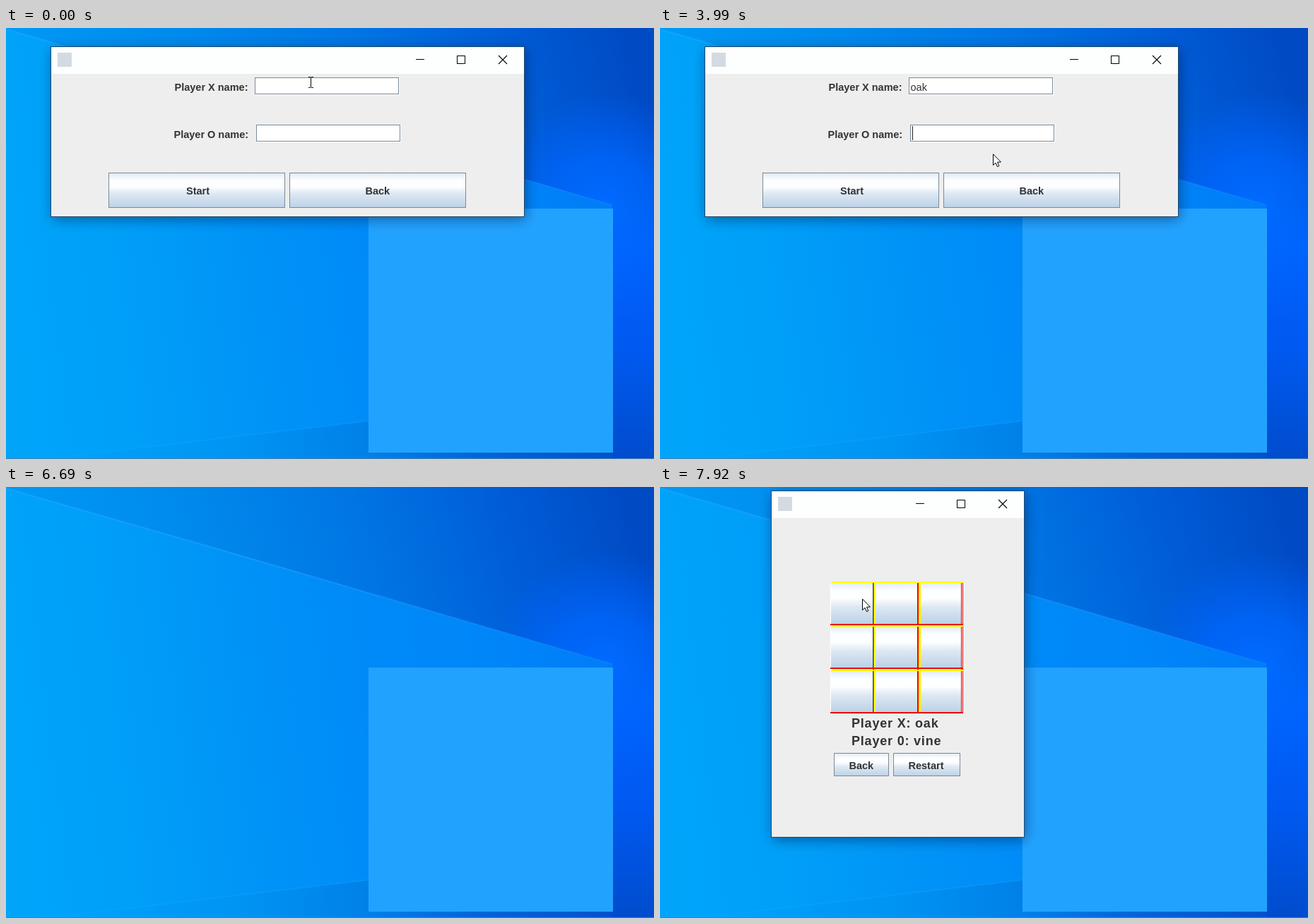
An HTML page with a canvas for the animation above (8000 ms loop, 917 by 611 pixels).

```html
<!DOCTYPE html>
<html lang="en">
<head>
<meta charset="utf-8">
<title>Player setup</title>
<style>
html, body { margin: 0; width: 100%; height: 100%; overflow: hidden; }
canvas { display: block; }
</style>
</head>
<body>
<canvas id="stage" width="917" height="611"></canvas>
<script>
const W = 917, H = 611, LOOP = 8000;
const NAME_X = 'oak', NAME_O = 'vine';
const FONT = '"Liberation Sans", Arial, sans-serif';
const INK = '#333', EDGE = '#7a8a99', YELLOW = '#ffff00', RED = '#f00000', DARK = '#3d4248';
const stage = document.getElementById('stage').getContext('2d');

// [start, x, y, shape]; every position holds until the next one
const pointer = [
  [0, 431, 77, 'beam'], [120, 432, 79, 'beam'], [250, 434, 84, 'beam'],
  [380, 437, 90, 'beam'], [510, 438, 93, 'beam'],
  [770, 438, 108, 'arrow'], [900, 440, 148, 'beam'], [1030, 441, 176, 'arrow'],
  [1160, 441, 203, 'arrow'], [1310, 456, 217, 'arrow'], [1470, 468, 209, 'arrow'],
  [1590, 472, 193, 'arrow'], [1740, 471, 178, 'arrow'], [5320, 469, 176, 'arrow'],
  [5440, 375, 16, 'arrow'], [5560, 267, 97, 'arrow'], [5700, 264, 160, 'arrow'],
  [5830, 257, 214, 'arrow'], [5950, 254, 223, 'arrow'], [6250, 258, 231, 'arrow'],
  [6400, 266, 232, 'arrow'], [6540, 114, 188, 'arrow'], [6690, 0, 0, 'none'],
  [7220, 301, 81, 'arrow'], [7370, 310, 74, 'arrow'], [7510, 316, 51, 'arrow'],
  [7640, 270, 28, 'arrow'], [7790, 306, 92, 'arrow'], [7920, 286, 158, 'arrow']
];
const gamePlace = [[7220, 189, 58], [7370, 198, 51], [7510, 204, 28], [7640, 158, 5]];
const caretX = [[0, 0], [250, 1], [770, 0], [1310, 1], [1740, 0], [2350, 1], [2770, 0], [3300, 1], [3990, 0]];
const typedX = [[0, 0], [3450, 1], [3570, 3]];
const typedO = [[0, 0], [4520, 1], [4650, 3], [4770, 4]];

const at = (steps, t) => steps.reduce((found, step) => step[0] <= t ? step : found, steps[0]);
const between = (t, from, to) => t >= from && t < to;

function layer(paint) {
  const canvas = document.createElement('canvas');
  canvas.width = W;
  canvas.height = H;
  paint(canvas.getContext('2d'));
  return canvas;
}

function fill(c, color, x, y, w, h) {
  c.fillStyle = color;
  c.fillRect(x, y, w, h);
}

function outline(c, color, x, y, w, h) {
  c.strokeStyle = color;
  c.lineWidth = 1;
  c.strokeRect(x + .5, y + .5, w - 1, h - 1);
}

function path(c, points, close) {
  c.beginPath();
  points.forEach(([x, y]) => c.lineTo(x, y));
  if (close) c.closePath();
}

function text(c, string, x, y, size, weight = 'bold', spacing = 0) {
  c.font = `${weight} ${size}px ${FONT}`;
  c.letterSpacing = spacing + 'px';
  c.fillStyle = INK;
  c.fillText(string, x, y);
  const width = c.measureText(string).width;
  c.letterSpacing = '0px';
  return width;
}

function ramp(gradient, stops) {
  stops.forEach(([offset, color]) => gradient.addColorStop(offset, color));
  return gradient;
}

const wallpaper = layer(c => {
  fill(c, ramp(c.createLinearGradient(60, 210, 880, 0), [
    [0, '#0099f5'], [.3, '#0088ec'], [.55, '#0075e4'], [.8, '#005cd6'], [1, '#004ac4']
  ]), 0, 0, W, H);
  fill(c, ramp(c.createLinearGradient(0, 250, 0, H), [
    [0, 'rgba(0,96,250,0)'], [.15, 'rgba(0,96,250,1)'], [.55, 'rgba(0,90,242,1)'], [1, 'rgba(0,76,205,1)']
  ]), 513, 250, W - 513, H - 250);
  fill(c, ramp(c.createRadialGradient(845, 255, 10, 845, 255, 165), [
    [0, 'rgba(0,106,255,1)'], [.4, 'rgba(0,103,255,.75)'], [1, 'rgba(0,98,255,0)']
  ]), 0, 0, W, H);

  // broad light beam, darkening softly towards its lower right
  path(c, [[0, 2], [300, 88], [858, 251], [858, 300], [513, H], [0, H]], true);
  c.fillStyle = ramp(c.createLinearGradient(0, 360, 858, 250), [
    [0, '#00a5fa'], [.2, '#009ef8'], [.42, '#0092f7'], [.6, '#008af8'], [.8, '#0086f8'], [1, '#007cf8']
  ]);
  c.fill();
  path(c, [[60, H], [513, 557], [858, 508], [858, H]], true);
  c.fillStyle = ramp(c.createLinearGradient(100, 0, 858, 0), [
    [0, '#00a2f9'], [.3, '#0094f3'], [.55, '#0080e8'], [.75, '#0066d8'], [1, '#0052cc']
  ]);
  c.fill();

  c.lineWidth = 2;
  c.strokeStyle = ramp(c.createLinearGradient(0, 0, 858, 251), [
    [0, 'rgba(40,170,255,.45)'], [.4, 'rgba(35,160,255,.6)'], [1, 'rgba(30,145,255,.3)']
  ]);
  path(c, [[0, 2], [300, 88], [858, 251]]);
  c.stroke();
  c.strokeStyle = 'rgba(20,165,255,.3)';
  path(c, [[80, 608], [513, 557]]);
  c.stroke();

  fill(c, '#22a2ff', 513, 256, 346, 346);
  fill(c, '#4d7ca5', 0, 610, W, 1);
});

function captionButtons(c, right, y) {
  fill(c, '#000', right - 153, y + 17, 12, 1);
  outline(c, '#000', right - 95, y + 12, 12, 12);
  c.lineWidth = 1.1;
  path(c, [[right - 36, y + 12], [right - 24, y + 24]]);
  c.stroke();
  path(c, [[right - 24, y + 12], [right - 36, y + 24]]);
  c.stroke();
}

function windowFrame(c, x, y, w, h, active = true) {
  c.save();
  if (active) {
    c.shadowColor = 'rgba(0,20,60,.5)';
    c.shadowBlur = 18;
    c.shadowOffsetX = 2;
    c.shadowOffsetY = 4;
  }
  fill(c, '#eee', x, y, w, h);
  c.restore();
  fill(c, '#fdfefe', x, y, w, 38);
  fill(c, '#d3dae2', x + 9, y + 8, 20, 20);
  if (active) {
    outline(c, '#22476b', x - 1, y - 1, w + 2, h + 2);
    captionButtons(c, x + w, y);
  }
}

function sheen(c, x, y, w, h) {
  fill(c, ramp(c.createLinearGradient(0, y, 0, y + h), [
    [0, '#dde8f3'], [.22, '#fdfeff'], [.4, '#fdfeff'], [.6, '#dde8f3'], [1, '#bcd1e6']
  ]), x, y, w, h);
}

function button(c, label, x, y, w, h, labelX, baseline, state) {
  if (state === 'pressed') fill(c, '#b8cfe5', x, y, w, h);
  else sheen(c, x, y, w, h);
  if (state === 'hover') {
    outline(c, '#b8cfe5', x + 1, y + 1, w - 2, h - 2);
    outline(c, '#b8cfe5', x + 2, y + 2, w - 4, h - 4);
  }
  outline(c, EDGE, x, y, w, h);
  text(c, label, labelX, baseline, 14.5);
}

function field(c, value, x, y, caret) {
  fill(c, '#fff', x, y, 205, 25);
  outline(c, EDGE, x, y, 204, 24);
  const width = value ? text(c, value, x + 2.5, y + 19, 14.5, 'normal') : 0;
  if (caret) fill(c, '#222', Math.round(x + 3 + width), y + 2, 1, 20);
}

function setupWindow(c, t, active = true) {
  windowFrame(c, 64, 27, 669, 240, active);
  text(c, 'Player X name:', 238.5, 89, 14.5);
  text(c, 'Player O name:', 237.5, 156, 14.5);
  field(c, NAME_X.slice(0, at(typedX, t)[1]), 352, 70, at(caretX, t)[1]);
  field(c, NAME_O.slice(0, at(typedO, t)[1]), 354, 137, between(t, 3990, 5320));
  const start = t >= 5950 ? 'pressed' : t >= 5830 ? 'hover' : '';
  button(c, 'Start', 145, 205, 250, 50, 255, 236, start);
  button(c, 'Back', 401, 205, 250, 50, 508.5, 236, between(t, 1310, 1590) ? 'hover' : '');
}

const fadingWindow = layer(c => setupWindow(c, 6100, false));

function board(c, x, y, settled) {
  const lines = settled
    ? [[0, 1, '#fff'], [60, 1, DARK], [61, 1, '#8a8a60'], [62, 2, YELLOW], [123, 2, RED],
       [125, 3, YELLOW], [185, 1, RED], [187, 1, RED]]
    : [[0, 3, YELLOW], [60, 1, RED], [62, 1, RED], [63, 3, YELLOW], [123, 2, RED],
       [125, 2, '#f4f6f8'], [185, 1, DARK], [187, 1, DARK]];
  fill(c, '#f6f8fa', x, y, 188, 187);
  for (let row = 0; row < 3; row++) {
    const top = y + Math.round(row * 62.3);
    for (let col = 0; col < 3; col++) sheen(c, x + 1 + Math.round(col * 62.3), top, 60, 60);
  }
  for (const [dx, width, color] of lines) fill(c, color, x + dx, y, width, 187);
  for (let row = 0; row < 3; row++) {
    const top = y + Math.round(row * 62.3);
    fill(c, YELLOW, x + 1, top, 187, 2);
    fill(c, RED, x, top + 60, 188, 2);
  }
}

function gameWindow(c, t) {
  const [, x, y] = at(gamePlace, t);
  windowFrame(c, x, y + 1, 357, 490);
  board(c, x + 83, y + 129, t >= 7640);
  text(c, 'Player X: ' + NAME_X, x + 113, y + 336, 18, 'bold', .8);
  text(c, 'Player 0: ' + NAME_O, x + 113, y + 361, 18, 'bold', .8);
  button(c, 'Back', x + 88, y + 372, 78, 33, x + 109.5, y + 395);
  button(c, 'Restart', x + 172, y + 372, 95, 33, x + 193.5, y + 395);
}

function drawPointer(c, t) {
  const [, x, y, shape] = at(pointer, t);
  c.save();
  c.translate(x, y);
  if (shape === 'beam') {
    fill(c, '#000', 0, -7, 1, 14);
    for (const end of [-8, 7]) {
      fill(c, '#000', -3, end, 3, 1);
      fill(c, '#000', 1, end, 3, 1);
    }
  } else if (shape === 'arrow') {
    path(c, [[.5, .8], [.5, 16.5], [4, 13.2], [6.4, 18.6], [8.8, 17.6], [6.5, 12.2], [11.4, 12]], true);
    c.fillStyle = '#fff';
    c.fill();
    c.lineWidth = 1;
    c.strokeStyle = '#000';
    c.stroke();
  }
  c.restore();
}

function draw(t) {
  stage.drawImage(wallpaper, 0, 0);
  if (t < 6100) setupWindow(stage, t);
  else if (t < 6250) {
    const scale = .957;
    stage.globalAlpha = .1;
    stage.drawImage(fadingWindow, 77 - 64 * scale, 31 - 27 * scale, W * scale, H * scale);
    stage.globalAlpha = 1;
  } else if (t >= 7220) gameWindow(stage, t);
  drawPointer(stage, t);
}

function tick() {
  draw(performance.now() % LOOP);
  requestAnimationFrame(tick);
}
tick();
</script>
</body>
</html>
```
